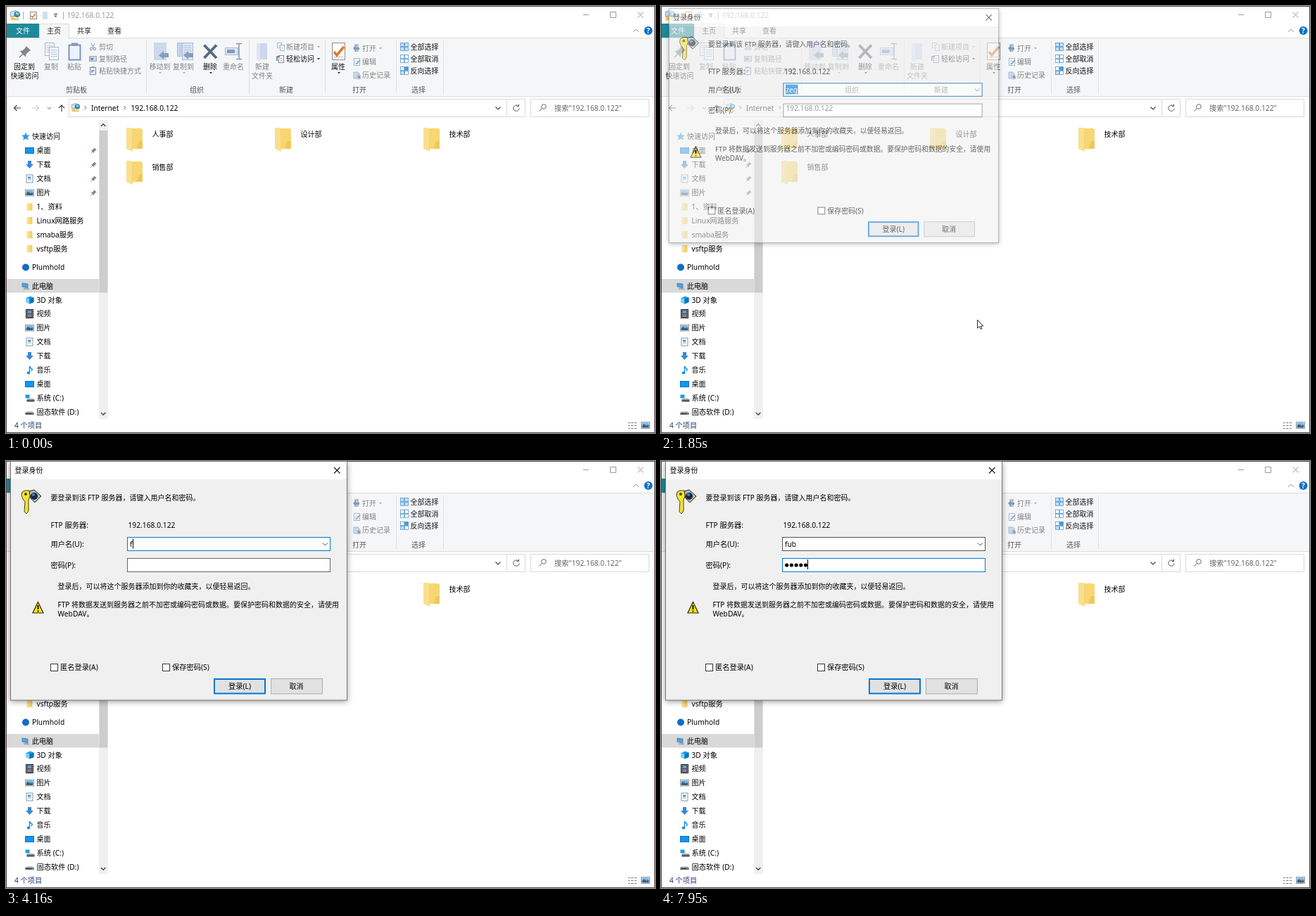
Animation of 922 by 607 pixels, one loop 8 s. Source, as an HTML page:

```html
<!DOCTYPE html>
<html lang="zh-CN">
<head>
<meta charset="utf-8">
<title>FTP 登录</title>
<style>
html, body { margin: 0; width: 100%; height: 100%; overflow: hidden; background: #fff; }
svg { display: block; width: 922px; height: 607px; }
text { font-family: "Noto Sans", "Noto Sans CJK SC", "Noto Sans CJK", sans-serif; white-space: pre; }
</style>
</head>
<body>
<svg id="stage" viewBox="0 0 922 607" xmlns="http://www.w3.org/2000/svg"></svg>
<script>
const LOOP = 8000, BLUE = '#0078d7', GREY = '#838383', HOST = '192.168.0.122';
const OLD_USER = 'zeg', USER = 'fub';

// Drawing helpers
const text = (x, cy, s, fill = '#000', anchor = 'start', extra = '') =>
  `<text x="${x}" y="${cy + 3.7}" fill="${fill}" text-anchor="${anchor}" font-size="${/[A-Za-z0-9]/.test(s) && s.length < 18 ? 10.25 : 10}" ${extra}>${s}</text>`;
const rect = (x, y, w, h, fill = 'none', stroke = 'none', sw = 1, extra = '') =>
  `<rect x="${x}" y="${y}" width="${w}" height="${h}" fill="${fill}" stroke="${stroke}" stroke-width="${sw}" ${extra}/>`;
const line = (d, stroke, w = 1) => `<path d="${d}" fill="none" stroke="${stroke}" stroke-width="${w}"/>`;
const shape = (d, fill, stroke = 'none', w = 1) => `<path d="${d}" fill="${fill}" stroke="${stroke}" stroke-width="${w}"/>`;
const dot = (x, y, r, fill) => `<circle cx="${x}" cy="${y}" r="${r}" fill="${fill}"/>`;
const at = (x, y, body, scale = 1) => `<g transform="translate(${x} ${y}) scale(${scale})">${body}</g>`;
const group = (id, body) => `<g id="${id}">${body}</g>`;
const texts = (rows, fill) => rows.map(([x, y, s]) => text(x, y, s, fill)).join('');

const page = (x, y, w, h, c = '#a5b6d2', fill = '#f3f7fd') => {
  let lines = '';
  for (let i = 4; i < h - 2; i += 3) lines += `M${x + 2} ${y + i}h${w - 4}`;
  return rect(x, y, w, h, fill, c) + line(lines, c, .8);
};
const pin = c => shape('M1 -5L5 -1L3.5 -.5L1 2L.5 4.5L-4.5 -.5L-2 -1L.5 -3.5Z', c) + line('M-1.5 1.5L-5 5', c);
const sheet = '#cbd8ee', slate = '#8498b8';

const icons = {
  net: shape('M-6 -4l7 -2v7l-7 1z', '#d5e6f0', '#7f95a3', .8) + shape('M-5 2h4v2h6v2.5h-11z', '#efcb55') +
       dot(2.5, -1, 4, '#2f86cc') + shape('M1 -4l4 1l-1 3l-3 -1z', '#a5d98a'),
  star: shape('M0 -6L1.7 -2L6 -1.8L2.7 1L4 5.3L0 3L-4 5.3L-2.7 1L-6 -1.8L-1.7 -2Z', '#2f9be8'),
  desk: rect(-6, -4, 12, 8, '#1097f0', '#0a6fc0'),
  down: shape('M-2.5 -5.5h5v5h3l-5.5 6l-5.5 -6h3z', '#3c86d8'),
  doc: page(-4.5, -5.5, 9, 11, '#7f98ab', '#fff') + rect(-2.5, -3, 4, 3, '#4a9bd8'),
  pic: rect(-6, -4.5, 12, 9, '#fff', '#9a9a9a') + rect(-5, -3.5, 10, 4, '#74b6e8') + shape('M-5 3.5v-3l3 -2l3 2l4 -1v4z', '#3a5f80'),
  fold: rect(-3, -5, 7, 10, '#f7d06a') + shape('M-4 -5h4v11l-4 -1z', '#fbe08f'),
  cloud: dot(0, 0, 5, '#0f6fc5'),
  pc: shape('M-5 -4l8 1v6l-8 -2z', '#47a5e6', '#4a7ea5', .8) + line('M-3 4l8 .5', '#8fa0ac', 1.5),
  cube: shape('M-5 -3L1 -5.5L6 -3.5V3L0 5.5L-5 3Z', '#1e9fe4') + shape('M-5 -3L0 -1.5V5.5L-5 3Z', '#77d0f4') + shape('M0 -1.5L6 -3.5V3L0 5.5Z', '#0b74bd'),
  film: rect(-5, -6, 10, 12, '#3c4650', '#222') + rect(-2.5, -5, 5, 4.5, '#6d9cc4') + rect(-2.5, .5, 5, 4.5, '#8a7f9b') +
        '<path d="M-4 -5v11M4 -5v11" stroke="#ddd" stroke-dasharray="1.5 1.5"/>',
  note: line('M0 3.5V-5.5Q1 -2.5 3.5 -1.5Q4 0 2.5 1.5', '#1b8ee6', 1.5) + '<ellipse cx="-1.5" cy="4" rx="2.4" ry="1.9" fill="#1b8ee6"/>',
  drive: shape('M-6 1l2 -2h8l2 2v3h-12z', '#c4c8cc') + rect(-6, 1, 12, 3, '#555b60') + rect(3, 2, 2, 1, '#6fe070'),
  sys: shape('M-4 2l2 -2h7l2 2v3h-11z', '#c4c8cc') + rect(-4, 2, 11, 3, '#555b60') + rect(-6, -5, 6, 5, '#14a0e8')
};

const folder = (x, y) => at(x, y,
  shape('M7 2H22L24 4V31H7Z', '#f8d671') + shape('M19 20h5v11h-9z', '#f0c75c') +
  shape('M1 1H8L10 6V35L1 31Z', '#fbdf8c') + line('M9.5 6V34', '#f3d47c'));
const check = (x, y, s) => at(x, y, line('M-3 0L-1 2.5L4 -3.5', '#e0762b', 1.8), s);
const tri = (x, y, c) => shape(`M${x - 2} ${y}h4l-2 2.2z`, c);
const winGrid = (x, y, c) => [0, 1, 2, 3].map(i => rect(x + i % 2 * 6, y + (i >> 1) * 6, 5, 5, c[i], '#5b9bd0', .8)).join('');

function ribbon() {
  let s = rect(0, 46, 922, 82, '#f5f6f7') + line('M0 45.5H922M0 128.5H922', '#dadbdc') +
    rect(0, 25, 47, 20, '#1f8999') + shape('M47.5 46.5V25.5H89.5V46.5', '#f5f6f7', '#dadbdc') +
    text(24, 35, '文件', '#fff', 'middle') + texts([[58, 35, '主页'], [101, 35, '共享'], [144, 35, '查看']], '#222') +
    line('M891 37l4 -4l4 4', '#999') + dot(912.5, 35, 6, '#0f70c8') + text(912.5, 35, '?', '#fff', 'middle', 'font-weight="700"') +
    line([199, 345, 453, 554, 621].map(x => `M${x + .5} 49V125`).join(''), '#e1e2e3');
  s += texts([[85, 119.5, '剪贴板'], [261, 119.5, '组织'], [388, 119.5, '新建'], [492, 119.5, '打开'], [576, 119.5, '选择']], '#555') +
    texts([[11, 86, '固定到'], [6.5, 99, '快速访问'], [280, 86, '删除'], [398, 75, '轻松访问'], [462, 86, '属性'],
      [574.5, 58, '全部选择'], [574.5, 75, '全部取消'], [574.5, 92, '反向选择']], '#111') +
    texts([[54, 86, '复制'], [87, 86, '粘贴'], [203.5, 86, '移动到'], [237, 86, '复制到'], [308, 86, '重命名'], [354, 86, '新建'],
      [349, 99, '文件夹'], [132, 58, '剪切'], [132, 75, '复制路径'], [132, 92, '粘贴快捷方式'], [398, 58, '新建项目'],
      [506, 60, '打开'], [506, 79, '编辑'], [506, 98.5, '历史记录']], GREY);
  // Clipboard
  s += at(27, 65, pin('#7d878f'), 1.65) + page(55.5, 52.5, 13, 18) + page(61.5, 58.5, 13, 18) +
    rect(89.5, 55.5, 16, 21, '#edf3fc', '#7b93bd', 2) + rect(93, 52.5, 9, 4, '#8497b6') +
    line('M121 53l4 7M126 53l-4 7', slate) + '<circle cx="121" cy="61" r="1.7" fill="none" stroke="#8498b8"/><circle cx="126" cy="61" r="1.7" fill="none" stroke="#8498b8"/>' +
    rect(118.5, 71.5, 10, 7, sheet, '#8fa5c8') + line('M120 73l1 4l1 -3l1 3l1 -4', '#5876a8', .8) +
    rect(119.5, 87.5, 8, 10, '#edf3fc', slate, 1.2) + rect(121.5, 86, 4, 2, slate) + line('M122 95v-3h3.5', '#5f7fb2', 1.3);
  // Organise
  const arrow = 'M0 0L7 -6V-3H14V3H7V6Z';
  s += rect(210, 52, 18, 25, sheet) + at(217, 70, shape(arrow, '#8c9db8')) +
    page(243.5, 52.5, 12, 19, '#a9bad6', sheet) + page(250.5, 52.5, 15, 24, '#a9bad6', '#dce6f5') + at(252, 70, shape(arrow, '#8c9db8')) +
    line('M281.5 55.5L299 74M299 55.5L281.5 74', '#596980', 4) +
    rect(311.5, 59.5, 18, 10, '#dce6f5', '#a9bad6') + rect(314, 62, 11, 5, slate) + line('M327 53.5h8M331 53.5V75.5M327 75.5h8', slate, 1.5) +
    tri(219, 94, '#aaa') + tri(253, 94, '#aaa') + tri(291, 94, '#222');
  // New, open
  s += rect(357, 53, 14, 23, sheet) + shape('M356 53h5v26l-5 -3z', '#dde6f4') +
    page(385.5, 52.5, 6, 7) + page(389.5, 55.5, 6, 8) + tri(444, 57, '#aaa') +
    page(387.5, 70.5, 7, 10, '#888', '#fff') + line('M385 78v-6h4', '#2f78c4', 1.5) + tri(444, 74, '#222') +
    rect(463.5, 52.5, 18, 24, '#fff', '#8b8b8b') + line('M466 72.5h13', '#bbb') + check(472, 65, 2) + tri(473, 94, '#222') +
    rect(495, 54, 6, 11, '#aebfd8') + shape('M493 60l4 -4v3h5v3h-5v3z', slate) + tri(532, 59, '#aaa') +
    page(494.5, 74.5, 8, 10) + line('M497 83l6 -6', slate, 1.5) +
    shape('M494 94h6l2 2v7h-8z', sheet, '#a9bad6') + dot(501, 101, 3.5, '#b9c6da') + line('M501 99v2.5h2', '#666');
  const b = '#bfe0fa', d = '#3c9be2', w = '#fff';
  return s + winGrid(560.5, 52.5, [b, b, b, b]) + winGrid(560.5, 69.5, [w, w, w, w]) + winGrid(560.5, 86.5, [w, d, b, w]);
}

function addressBar() {
  return line('M21 145H11.5M15.5 141L11.5 145L15.5 149', '#444', 1.2) + line('M37 145H46.5M42.5 141L46.5 145L42.5 149', '#ccc', 1.2) +
    line('M59 144l2.5 2.5l2.5 -2.5', '#666') + line('M79 150V141M75 145L79 141L83 145', '#444', 1.2) +
    rect(89.5, 132.5, 648, 25, '#fff', '#d9d9d9') + line('M711.5 133V157', '#d9d9d9') + at(99, 144, icons.net, .95) +
    line('M111.5 142l2.5 2.5l-2.5 2.5M167.5 142l2.5 2.5l-2.5 2.5', '#555') +
    text(121, 145, 'Internet') + text(177.5, 145, HOST) +
    line('M695.5 143.5l3.5 3.5l3.5 -3.5', '#444', 1.2) + line('M729.2 145.5A4.2 4.2 0 1 1 728 142.2M728.5 139.5v3h-3', '#555') +
    rect(745.5, 132.5, 168, 25, '#fff', '#d9d9d9') + '<circle cx="764" cy="143" r="3.3" fill="none" stroke="#666"/>' +
    line('M761.5 145.5L757.5 149.5', '#666') + text(779, 145, `搜索"${HOST}"`, '#666');
}

function sidebar() {
  const items = [['star', '快速访问', 185.5], ['desk', '桌面', 205.5], ['down', '下载', 225.5], ['doc', '文档', 245.5], ['pic', '图片', 265.5],
    ['fold', '1、资料', 285.5], ['fold', 'Linux网路服务', 305], ['fold', 'smaba服务', 325], ['fold', 'vsftp服务', 345], ['cloud', 'Plumhold', 371.5],
    ['pc', '此电脑', 398], ['cube', '3D 对象', 418], ['film', '视频', 437.5], ['pic', '图片', 457.5], ['doc', '文档', 477.5],
    ['down', '下载', 497.5], ['note', '音乐', 517.5], ['desk', '桌面', 537.5], ['sys', '系统 (C:)', 557.5], ['drive', '固态软件 (D:)', 577]];
  const roots = { star: 1, cloud: 1, pc: 1 };
  return rect(1, 388, 131, 19.5, '#d9d9d9') +
    items.map(([icon, name, y], i) => at(roots[icon] ? 28 : 33.5, y, icons[icon]) + text(roots[icon] ? 37 : 43.5, y, name) +
      (i > 0 && i < 5 ? at(124.5, y, pin('#7b8894'), .85) : '')).join('') +
    rect(132, 162, 13, 425, '#f0f0f0') + rect(132.5, 177, 12, 230.5, '#cdcdcd') +
    line('M135 171l3.2 -3.2l3.2 3.2M135 578l3.2 3.2l3.2 -3.2', '#444', 1.4);
}

function explorer() {
  const listIcon = [592.5, 596.5, 600.5].map(y => `M884 ${y}h2.5M888 ${y}h3.5M893 ${y}h3`).join('');
  return rect(0, 0, 922, 607, '#fff') + at(13, 13, icons.net, 1.1) +
    line('M24.5 8v11M81.5 8v11', '#aaa') + rect(34.5, 8.5, 9, 10, '#fff', '#888') + check(38.5, 14, .9) +
    rect(52, 8, 7, 11, '#cfe0ee') + line('M68 11.5h5', '#333') + tri(70.5, 13.5, '#333') +
    group('caption', text(86.5, 13, HOST, 'currentColor') + line('M820 12.5h8M858.5 8.5h8v8h-8zM897.5 8.5l8 8M905.5 8.5l-8 8', 'currentColor')) +
    ribbon() + addressBar() + sidebar() +
    group('focus', rect(160.5, 214.5, 207, 43.5, '#fff', '#a4d2f4')) +
    [['人事部', 170, 172], ['设计部', 381, 172], ['技术部', 592, 172], ['销售部', 170, 219]].map(([n, x, y]) => folder(x, y) + text(x + 37.5, y + 10, n)).join('') +
    text(12, 596.5, '4 个项目', '#1e3a66') + line(listIcon, '#777') +
    at(908.5, 596, icons.pic) + group('edge', rect(.5, .5, 921, 606, 'none', '#55484f'));
}

// Context menu: centre y, label, disabled, has submenu
const rows = [[318, '查看(V)', 0, 1], [337, '排序方式(O)', 0, 1], [355.5, '分组依据(P)', 0, 1], [374, '刷新(E)'], [398.5, '粘贴(P)', 1],
  [417, '粘贴快捷方式(S)', 1], [441.5, '登录(A)...'], [460.5, '新建(N)', 0, 1], [485, '属性(R)']];
const panel = (x, y, w, h) => rect(x + 2, y + 2, w, h, '#8c8c8c', 'none', 1, 'filter="url(#soft)"') + rect(x, y, w, h, '#fff', '#a8a8a8');

function menus() {
  const sub = [[338.5, '名称'], [357.5, '大小'], [376, '类型'], [394.5, '修改日期'], [413, '创建日期'], [431.5, '访问日期'],
    [456.5, '递增(A)'], [475, '递减(D)'], [499, '更多(M)...']];
  return group('sub', panel(546.5, 326.5, 132, 185.5) + group('subBody', rect(547, 327, 131, 184.5, '#eee') +
      sub.map(([y, s]) => text(569.5, y, s, '#222')).join('') + line('M550 443.5H670M550 487.5H670', '#999') +
      dot(556.5, 338.5, 2.2, '#222') + dot(556.5, 456.5, 2.2, '#222'))) +
    group('menu', panel(380.5, 305.5, 164.5, 191.5) + rect(381, 306, 163.5, 190.5, '#eee') + rect(383, 0, 160, 18.5, '#fff', 'none', 1, 'id="hover"') +
      line('M388 386.5H537M388 429.5H537M388 472.5H537', '#979797') +
      rows.map(([y, s, off, more]) => text(408, y, s, off ? '#777' : '#000') + (more ? line(`M530.5 ${y - 5}l5 5l-5 5`, '#222', 1.2) : '')).join('')) +
    group('chosen', text(408, 441.5, '登录(A)...'));
}

function dialog() {
  const box = x => rect(x + .5, 288.5, 10, 10, '#fff', '#333');
  return group('dialog',
    rect(6, 2, 479, 340, '#000', 'none', 1, 'opacity=".4" filter="url(#glow)"') +
    rect(6.5, .5, 478, 339.5, '#f0f0f0', '#777') + rect(7, 1, 477, 25, '#fff') +
    text(12.5, 13, '登录身份') + line('M466 9l8.5 8.5M474.5 9l-8.5 8.5', '#111', 1.1) +
    shape('M23 44l4 -2h6l2 5l-2 6l-1 2v16l-3 4l-3 -3l1 -14l-3 -4l-2 -5z', '#f2e23c', '#4a4408') + dot(28, 47, 2, '#4a4408') +
    shape('M33 43l7 -2l10 9l-9 9l-6 -6z', '#b9b9a0', '#222') + dot(40, 50, 5, '#16264a') + dot(39, 48, 2, '#4f86c8') +
    text(63.5, 52, '要登录到该 FTP 服务器，请键入用户名和密码。') + text(63.5, 91.5, 'FTP 服务器:') + text(173.5, 91.5, HOST) +
    text(63.5, 118, '用户名(U):') + text(63.5, 148, '密码(P):') +
    rect(172.5, 108.5, 288, 19, '#fff', '#555') + rect(172.5, 138.5, 288, 19, '#fff', '#666') +
    rect(172.5, 108.5, 288, 19, 'none', BLUE, 1, 'id="userFocus"') + rect(172.5, 138.5, 288, 19, 'none', BLUE, 1, 'id="passFocus"') +
    line('M450 116.5l3.5 3.5l3.5 -3.5', '#444') +
    rect(175.5, 110.5, 18, 14, BLUE, 'none', 1, 'id="mark"') + text(176, 118, OLD_USER, '#fff', 'start', 'id="user"') +
    group('dots', [0, 1, 2, 3, 4].map(i => dot(178.7 + i * 6.7, 148, 2.6, '#000')).join('')) +
    rect(0, 0, 1, 14, '#000', 'none', 1, 'id="caret"') +
    text(73.5, 178, '登录后，可以将这个服务器添加到你的收藏夹，以便轻易返回。') +
    shape('M45.5 200.5L53 216H38Z', '#ffe600', '#222', 1.2) + line('M45.5 205v6M45.5 212.5v2', '#000', 1.8) +
    text(73.5, 204.5, 'FTP 将数据发送到服务器之前不加密或编码密码或数据。要保护密码和数据的安全，请使用') + text(73.5, 217.5, 'WebDAV。') +
    box(63) + text(77, 293.5, '匿名登录(A)') + box(222) + text(236, 293.5, '保存密码(S)') +
    rect(296, 310, 72, 20.5, '#e1e1e1', BLUE, 2) + text(332, 320.5, '登录(L)', '#000', 'middle') +
    rect(376.5, 309.5, 73, 21.5, '#e1e1e1', '#adadad') + text(412.5, 320.5, '取消', '#000', 'middle'));
}

const pointers = group('arrow', shape('M0 0V12L2.8 9.5L4.7 13.5L6.4 12.7L4.6 9H8.2Z', '#fff', '#111', .9)) +
  group('ibeam', line('M-2.5 -7.5h2l.5 1l.5 -1h2M0 -6.5V6.5M-2.5 7.5h2l.5 -1l.5 1h2', '#111')) +
  group('busy', dot(0, 0, 7, '#fff') + '<circle r="5" fill="none" stroke="#1e96e6" stroke-width="3"/>' +
    '<path id="spin" d="M0 -5A5 5 0 0 1 5 0" fill="none" stroke="#7cc6f5" stroke-width="2"/>');

document.getElementById('stage').innerHTML =
  '<defs><filter id="soft"><feGaussianBlur stdDeviation=".8"/></filter><filter id="glow"><feGaussianBlur stdDeviation="4"/></filter></defs>' +
  explorer() + menus() + dialog() + pointers;

const el = {};
document.querySelectorAll('[id]').forEach(n => el[n.id] = n);
const show = (n, on) => n.style.display = on ? '' : 'none';

// Pointer path: time, x, y, shape
const path = [[0, 0, 0, ''], [160, 762, 545, 'arrow'], [470, 380, 305, 'arrow'], [730, 380, 305, 'arrow'], [910, 409, 341, 'arrow'],
  [1030, 409, 341, 'arrow'], [1340, 437, 438, 'arrow'], [1460, 441.5, 444, 'busy'], [1790, 449.5, 446, 'arrow'], [1910, 449.5, 446, 'arrow'],
  [2220, 262, 21, 'arrow'], [2480, 260.5, 28.5, 'arrow'], [2740, 251.5, 106, 'arrow'], [2790, 251.5, 117.5, 'ibeam'], [4160, 0, 0, ''],
  [6750, 251.5, 117.5, 'ibeam'], [6870, 251.5, 121.5, 'ibeam'], [7370, 0, 0, '']];

// Typing: time, letters of the name (-1: old name selected), caret x (0: off), password dots
const keys = [[0, -1, 0, 0], [3170, -1, 193, 0], [3730, -1, 0, 0], [4160, 1, 180, 0], [4270, 2, 186, 0], [4520, 3, 192, 0],
  [5010, 3, 0, 0], [5510, 2, 186, 0], [5710, 1, 180, 0], [5820, 0, 176, 0], [6000, 1, 180, 0], [6100, 2, 186, 0], [6250, 3, 192, 0],
  [6750, 3, 0, 0], [6940, 3, 175, 0], [7310, 3, 181.5, 1], [7500, 3, 188, 2], [7750, 3, 195, 3], [7810, 3, 201, 4], [7950, 3, 208, 5]];

const last = (table, t) => table.findLastIndex(r => r[0] <= t);
// Rises from 0 to 1 in jumps of about 60 ms
const ramp = (t, a, b) => {
  const n = Math.max(1, Math.round((b - a) / 62));
  return Math.min(1, Math.max(0, Math.floor((t - a) / (b - a) * n + 1e-6) / n));
};

function pointer(t) {
  const i = last(path, t), a = path[i], b = path[i + 1];
  const k = b && a[3] === b[3] ? ramp(t, a[0], b[0]) : 0;
  const x = k ? a[1] + (b[1] - a[1]) * k : a[1], y = k ? a[2] + (b[2] - a[2]) * k : a[2];
  for (const name of ['arrow', 'ibeam', 'busy']) {
    show(el[name], a[3] === name);
    el[name].setAttribute('transform', `translate(${x} ${y})`);
  }
  el.spin.setAttribute('transform', `rotate(${Math.floor(t / 60) * 45})`);
  return { x, y };
}

function render(t) {
  const cursor = pointer(t);
  const active = t >= 610 && t < 1790;
  el.caption.style.color = active ? '#000' : '#999';
  show(el.focus, active);
  show(el.edge, !active);

  show(el.menu, t >= 610 && t < 1460);
  el.menu.style.opacity = ramp(t, 550, 730);
  const row = rows.find(r => Math.abs(r[0] - cursor.y) < 9.4);
  show(el.hover, row && t > 730);
  if (row) el.hover.setAttribute('y', row[0] - 9.2);
  show(el.sub, t >= 910 && t < 1280);
  el.subBody.style.opacity = ramp(t, 850, 1030) ** 1.2;
  show(el.chosen, t >= 1460 && t < 1760);
  el.chosen.style.opacity = 1 - ramp(t, 1400, 1760);

  const open = ramp(t, 1730, 1970), size = 1 - .08 * (1 - open) ** 2;
  show(el.dialog, t >= 1790);
  el.dialog.style.opacity = open ** .75;
  el.dialog.setAttribute('transform', `translate(${245 * (1 - size)} ${170 * (1 - size)}) scale(${size})`);

  const [, typed, caret, dots] = keys[last(keys, t)];
  const fresh = typed < 0, inPass = t >= 6940;
  el.user.textContent = fresh ? OLD_USER : USER.slice(0, typed);
  el.user.setAttribute('fill', fresh ? '#fff' : '#000');
  show(el.mark, fresh);
  show(el.caret, caret);
  el.caret.setAttribute('x', caret);
  el.caret.setAttribute('y', inPass ? 140 : 110.5);
  [...el.dots.children].forEach((d, i) => show(d, i < dots));
  const shift = ramp(t, 6880, 7130);
  el.userFocus.style.opacity = 1 - shift;
  el.passFocus.style.opacity = shift;
}

const start = performance.now();
function tick() {
  render((performance.now() - start) % LOOP);
  requestAnimationFrame(tick);
}
tick();
</script>
</body>
</html>
```
